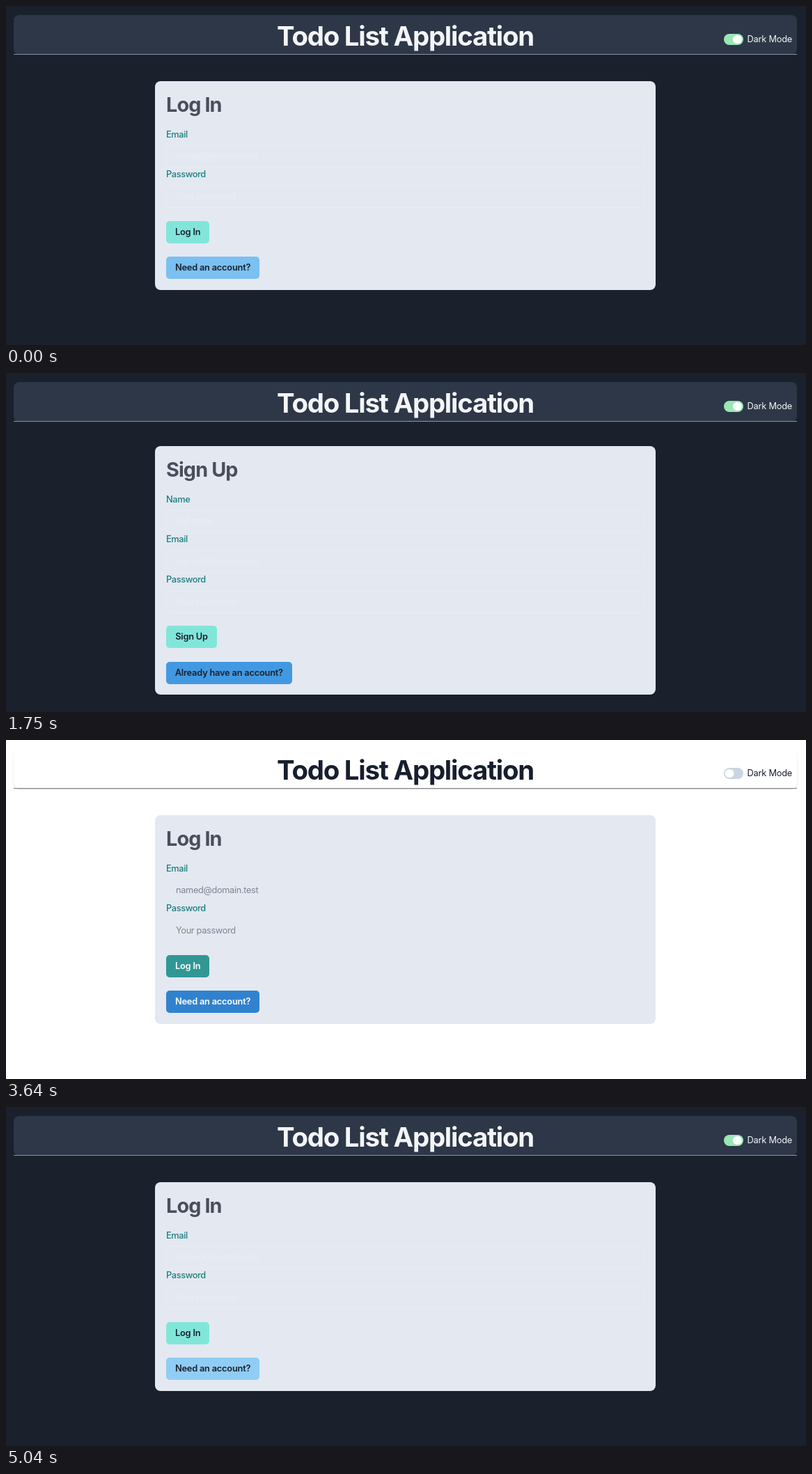
An HTML page for the animation above (5.11 s loop, 1149 by 487 pixels).

```html
<!DOCTYPE html>
<html lang="en">
<head>
<meta charset="utf-8">
<title>Todo List Application</title>
<style>
html, body { margin: 0; width: 100%; height: 100%; overflow: hidden; }
body { font: 400 12.8px/20px Inter, "Open Sans", sans-serif; font-optical-sizing: none; letter-spacing: -.018em; }
#stage { position: relative; width: 1149px; height: 487px; overflow: hidden; }
#stage div { position: absolute; box-sizing: border-box; white-space: nowrap; }
#header { left: 11px; top: 13px; width: 1125px; height: 57px; border-radius: 8px; }
#rule { left: 11px; top: 69px; width: 1125px; height: 1.2px; }
#title { left: 11px; top: 18px; width: 1125px; text-align: center; font-weight: 700; font-size: 38.4px; line-height: 50px; letter-spacing: -.032em; }
#track { left: 1031.4px; top: 40px; width: 27.2px; height: 16px; border-radius: 8px; }
#thumb { left: 0; top: 1.6px; width: 12.8px; height: 12.8px; border-radius: 50%; background: #fff; }
#mode { left: 1064.5px; top: 38px; }
.card { left: 214px; width: 719px; border-radius: 8px; background: #e4e8f1; }
.card div { left: 16px; }
.card .head { top: 13.4px; font-weight: 700; font-size: 28.8px; line-height: 40px; letter-spacing: -.031em; color: #4a4e5c; }
.card .label { font-weight: 500; letter-spacing: -.03em; color: #1a807e; }
.card .field { width: 687px; height: 32px; padding-left: 13px; border: 1px solid; border-radius: 5px; line-height: 30px; letter-spacing: -.028em; }
.card .button { height: 32px; border-radius: 5px; text-align: center; font-weight: 600; line-height: 32px; letter-spacing: -.016em; }
</style>
</head>
<body>
<div id="stage">
  <div id="header"></div>
  <div id="rule"></div>
  <div id="title">Todo List Application</div>
  <div id="track"><div id="thumb"></div></div>
  <div id="mode">Dark Mode</div>
</div>
<script>
const LOOP = 5110, STEP = 70;
const SIGNUP_AT = 366, LOGIN_AT = 1814, ENTER = 432, RISE = 24;
const LIGHT_AT = 3400, DARK_AT = 4590, FADE = 240;
const FIELD_GAP = 57.6;

const INK = [26, 32, 44], WHITE = [255, 255, 255];
const TEAL = [129, 230, 217], TEAL_DEEP = [49, 151, 149];
const BLUE = [144, 205, 244], BLUE_HOVER = [99, 179, 237];
const BLUE_PRESS = [66, 153, 225], BLUE_DEEP = [49, 130, 206];

const $ = id => document.getElementById(id);
const stage = $('stage');
const ramp = (t, start, len) => Math.min(1, Math.max(0, (t - start) / len));
const smooth = p => p * p * (3 - 2 * p);
const inOut = p => p < .5 ? 4 * p ** 3 : 1 - 4 * (1 - p) ** 3;
const mix = (a, b, p) => a.map((v, i) => v + (b[i] - v) * p);
const rgb = c => `rgb(${c.map(Math.round).join()})`;

function add(parent, cls, top, text = '', width) {
  const el = document.createElement('div');
  el.className = cls;
  el.style.top = top + 'px';
  if (width) el.style.width = width + 'px';
  el.textContent = text;
  parent.append(el);
  return el;
}

function makeCard(top, heading, fields, width, other, otherWidth) {
  const box = add(stage, 'card', top);
  const extra = (fields.length - 2) * FIELD_GAP;
  box.style.height = 299.4 + extra + 'px';
  add(box, 'head', 13.4, heading);
  const inputs = fields.map(([label, hint], i) => {
    add(box, 'label', 66.2 + i * FIELD_GAP, label);
    return add(box, 'field', 92 + i * FIELD_GAP, hint);
  });
  return {
    box, inputs,
    main: add(box, 'button', 200.5 + extra, heading, width),
    alt: add(box, 'button', 251.7 + extra, other, otherWidth)
  };
}

const email = ['Email', 'named@domain.test'];
const password = ['Password', 'Your password'];
const login = makeCard(108.4, 'Log In', [email, password], 62.4, 'Need an account?', 134.2);
const signup = makeCard(105.4, 'Sign Up', [['Name', 'Full name'], email, password], 73, 'Already have an account?', 180.6);

// Share of light mode at t, for a given easing
const lightness = (t, ease) =>
  t < DARK_AT ? ease(ramp(t, LIGHT_AT, FADE)) : 1 - ease(ramp(t, DARK_AT, FADE));

function pointerBlue(t, hoverAt, pressAt) {
  const hover = mix(BLUE, BLUE_HOVER, smooth(ramp(t, hoverAt, 140)));
  return mix(hover, BLUE_PRESS, smooth(ramp(t, pressAt, 140)));
}

function altBlue(t) {
  if (t < SIGNUP_AT) return pointerBlue(t, -70, 180);
  if (t < LOGIN_AT) return pointerBlue(t, 1450, 1620);
  return BLUE;
}

function drawCard(card, shown, since, t, lit) {
  card.box.style.display = shown ? 'block' : 'none';
  if (!shown) return;
  const left = (1 - ramp(t, since, ENTER)) ** 3;
  card.box.style.opacity = 1 - left;
  card.box.style.transform = left ? `translateY(${RISE * left}px)` : 'none';
  const p = lightness(t, smooth);
  for (const input of card.inputs) {
    input.style.color = lit ? '#7d8594' : 'rgba(255,255,255,.26)';
    input.style.borderColor = lit ? '#e2e8f0' : 'rgba(255,255,255,.18)';
  }
  card.main.style.background = rgb(mix(TEAL, TEAL_DEEP, p));
  card.alt.style.background = rgb(mix(altBlue(t), BLUE_DEEP, p));
  card.main.style.color = card.alt.style.color = rgb(mix(INK, WHITE, p));
}

function draw(t) {
  const lit = t >= LIGHT_AT && t < DARK_AT;
  const p = lightness(t, inOut);
  const slide = lightness(t, x => 1 - (1 - x) ** 2);
  stage.style.background = rgb(mix(INK, WHITE, p));
  $('header').style.background = lit ? '#fff' : '#2d3748';
  $('header').style.boxShadow = lit ? `0 1px 2px rgba(0,0,0,${.16 * p})` : 'none';
  $('rule').style.background = lit ? '#7b7d82' : '#8896aa';
  $('rule').style.opacity = lit ? p : 1;
  $('title').style.color = $('mode').style.color = lit ? '#171e2e' : '#f4f5f7';
  $('track').style.background = rgb(mix([154, 230, 180], [203, 213, 224], lightness(t, smooth)));
  $('thumb').style.transform = `translateX(${12.8 - 11.2 * slide}px)`;

  const signing = t >= SIGNUP_AT && t < LOGIN_AT;
  drawCard(signup, signing, SIGNUP_AT, t, lit);
  drawCard(login, !signing, t < SIGNUP_AT ? -LOOP : LOGIN_AT, t, lit);
}

const begin = performance.now();
function tick() {
  const t = (performance.now() - begin) % LOOP;
  draw(Math.floor(t / STEP) * STEP);
  requestAnimationFrame(tick);
}
tick();
</script>
</body>
</html>
```
